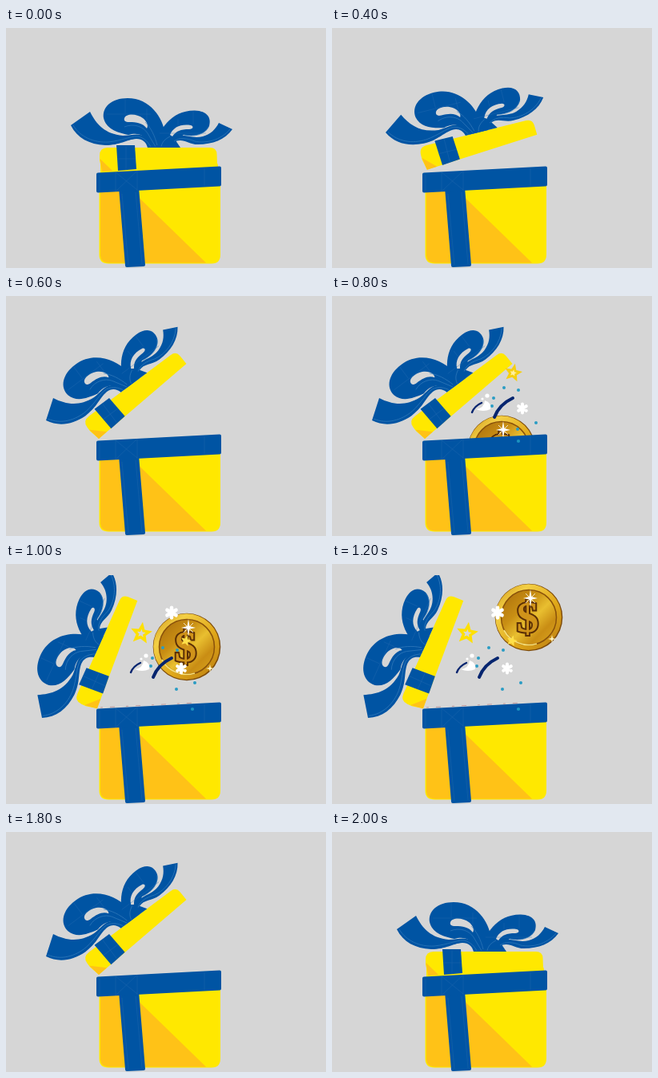
Recreate the animation shown at these times as an HTML page. Size 400 by 301 pixels, loop 2.2 s.

```html
<!DOCTYPE html>
<html lang="en">
<head>
<meta charset="utf-8">
<title>Gift box</title>
<style>
  html, body { margin: 0; width: 100%; height: 100%; overflow: hidden; background: #d6d6d6; }
  svg { display: block; width: 400px; height: 301px; }
  .blue { fill: #0054a3; }
  .shine { fill: none; stroke: #3b80bf; stroke-width: .8; opacity: .75; }
  .seam { fill: none; stroke: #2a6db2; stroke-width: .6; opacity: .6; }
  .streak { fill: none; stroke: #06256f; stroke-linecap: round; }
  #coin text { font: bold 55px "Liberation Serif", serif; text-anchor: middle; }
</style>
</head>
<body>
<svg viewBox="0 0 400 301">
  <defs>
    <linearGradient id="rim" x1="0" y1="0" x2="1" y2="1">
      <stop offset="0" stop-color="#c98d14"/><stop offset=".25" stop-color="#f3cf45"/>
      <stop offset=".6" stop-color="#e0a81a"/><stop offset="1" stop-color="#b87a10"/>
    </linearGradient>
    <linearGradient id="face" x1="0" y1="0" x2="1" y2="1">
      <stop offset="0" stop-color="#a86c0c"/><stop offset=".35" stop-color="#c98f14"/>
      <stop offset=".55" stop-color="#e9bf30"/><stop offset=".75" stop-color="#c98d14"/>
      <stop offset="1" stop-color="#dba920"/>
    </linearGradient>
    <clipPath id="stage"><path d="M0 14H400V301H0Z"/></clipPath>
    <path id="star" d="M0-11L3-3.5L11-3L5 2.5L7 10L0 6L-7 10L-5 2.5L-11-3L-3-3.5Z"/>
    <g id="flower" stroke="#fff" stroke-width="4" stroke-linecap="round">
      <path d="M0-5.500V5.500M-4.800-2.800L4.800 2.800M-4.800 2.800L4.800-2.800"/>
    </g>
  </defs>

  <g id="coin">
    <circle r="42.3" fill="#7d4a09"/>
    <circle cx="-.4" cy="-.4" r="41.3" fill="url(#rim)"/>
    <circle r="34.5" fill="url(#face)" stroke="#8a520b" stroke-width="1.5"/>
    <path d="M-31 16A35 35 0 0 0 10 33" fill="none" stroke="#f9e27a" stroke-width="1.6"/>
    <text x="-1.500" y="18" fill="#d0931a" stroke="#5c3006" stroke-width="4" paint-order="stroke">$</text>
    <path d="M2-35L3.5-26L11-24L3.5-22.5L2-13L.5-22.5L-7-24L.5-26Z" fill="#fff"/>
    <path d="M-4-30L8-18M8-30L-4-18" stroke="#fff" stroke-width=".8"/>
    <path d="M29 22L30 26L34 27L30 28L29 32L28 28L24 27L28 26Z" fill="#fff4c0"/>
  </g>

  <path id="seal" d="M118 170H264.500L266 180L118 190Z" fill="#ffe800"/>
  <g clip-path="url(#stage)">
    <g id="lid">
      <path d="M127 150H255Q263 150 263.500 158L264 170.500L120 180L117 166V160Q117 150 127 150Z" fill="#ffe800"/>
      <path d="M117.5 164L133 179L120 180Z" fill="#ffc217"/>
      <path class="blue" d="M138 147H161L163 177L140 179Z"/>
      <g class="blue">
        <path d="M81 122L105 105C113 121 124 133 146 135C158 135 167 130 176 138L184 150H177C175 143 171 139 163 139C150 140 143 147 124 147C104 146 89 138 81 122Z"/>
        <path fill-rule="evenodd" d="M199 133C196 112 180 88 152 88C132 88 120 99 122 113C125 126 138 131 153 134C166 130 174 136 178 142L183 150H206ZM148 113C150 107 163 107 171 113C177 118 178 123 176 126C171 119 163 118 154 118C149 118 147 116 148 113Z"/>
        <path fill-rule="evenodd" d="M186 150C190 129 206 103 236 103.500C252 104 257 113 254 123C250 133 236 137 222 134L212 141L218 150ZM205 134C209 124 219 120 231 122C235 123 234 127 229 127C218 127 213 129 208 136Z"/>
        <path d="M266 119L283 127C274 140 258 146 240 146C228 146 222 138 212 142L206 137C222 131 232 140 246 136C256 133 262 127 266 119Z"/>
      </g>
      <g class="shine">
        <path d="M84 122C93 137 110 144 128 143C146 141 153 136 165 136C174 138 178 144 181 149"/>
        <path d="M148 124C160 119 172 124 177 132L187 149M174 118C181 125 186 135 189 147"/>
        <path d="M205 136C199 139 195 143 194 149M253 124C248 134 235 137 222 134M280 127C268 141 250 145 236 142C226 138 217 137 210 142"/>
      </g>
      <path class="seam" d="M126 108H181M149 89V107M176 101V116M192 132H250M215 114V122M234 105V121M139 164H162M150 148V178"/>
    </g>
  </g>

  <g id="box">
    <path d="M116.500 190L268 185V284Q268 295.500 257 295.500H128Q116.500 295.500 116.500 284Z" fill="#ffe800"/>
    <path d="M118 195H148L250 294.500H129Q118 294.500 118 284Z" fill="#ffc217"/>
    <path class="blue" d="M141 200H166L174 297Q174 299 172 299L151 300Q149 300 149 298Z"/>
    <path class="blue" d="M115 181.500L267 173.500Q269 173.500 269 175.500V196.500Q269 198.300 267 198.500L115 206.500Q113 206.500 113 204.500V183.500Q113 181.500 115 181.500Z"/>
    <path class="seam" d="M137 181V205M164 179V204M117 184V204M248 176V198M137 181L164 203M137 205L164 179M145 208L153 297M162 206L170 296"/>
  </g>

  <g id="sparks">
    <g id="burst">
      <path class="streak" stroke-width="4" d="M184 142Q190 126 207 118"/>
      <path class="streak" stroke-width="2.4" d="M156 136Q159 128 168 124"/>
      <g id="dots" fill="#2a9cc4"></g>
      <path d="M161 132Q171 131 172 121Q181 124 179 132Q170 136 161 132Z" fill="#fff"/>
      <circle cx="175" cy="115" r="2.6" fill="#fff"/>
      <circle cx="169" cy="119" r="1.6" fill="#fff"/>
      <use href="#flower" x="219" y="131"/>
    </g>
    <circle cx="233" cy="182" r="2.1" fill="#1c93c0"/>
    <use id="early" href="#star" transform="translate(226.500 96) rotate(12) scale(.7)" fill="#fff0a0" stroke="#f5cf10" stroke-width="4"/>
    <g id="late">
      <use href="#star" transform="translate(169 86.500) rotate(8) scale(.85)" fill="#d6d6d6" stroke="#ffe000" stroke-width="4"/>
      <use href="#star" transform="translate(225 96) rotate(15) scale(.6)" fill="#ffe04a"/>
      <use href="#flower" transform="translate(207 61) scale(1.15)"/>
      <path d="M118 180L238 174" stroke="#a5464e" stroke-width=".7" stroke-dasharray="3 9 6 14" opacity=".6"/>
    </g>
  </g>
</svg>
<script>
const $ = id => document.getElementById(id);
const LOOP = 2200;
const closed = [81, 122, 0], ajar = [67, 131, -14], open = [50, 156, -36.9], wide = [45, 193, -65.8];

// Each step: start time, lid pose (tail tip x, y, angle), coin centre, burst offset
const steps = [
  [0, closed],
  [400, ajar],
  [600, open],
  [800, open, [212, 192], [19, 10]],
  [1000, wide, [226, 104], [0, 0]],
  [1200, wide, [246, 67], [0, 0]],
  [1800, open],
  [2000, closed]
];

$("dots").innerHTML = [[196, 105], [214, 108], [236, 149], [213, 157], [183, 118], [181, 128]]
  .map(([x, y]) => `<circle cx="${x}" cy="${y}" r="2"/>`).join("");

const show = (id, on) => $(id).style.display = on ? "" : "none";
const move = (id, value) => $(id).setAttribute("transform", value);

function draw(now) {
  const t = now % LOOP;
  const [, pose, coin, burst] = steps.findLast(s => s[0] <= t);
  const [x, y, angle] = pose;
  move("lid", `translate(${x} ${y}) rotate(${angle}) translate(-81 -122)`);
  show("seal", pose === closed);
  show("coin", coin);
  show("sparks", burst);
  if (coin) {
    move("coin", `translate(${coin})`);
    move("burst", `translate(${burst})`);
    show("early", pose === open);
    show("late", pose === wide);
  }
}

function tick() {
  draw(performance.now());
  requestAnimationFrame(tick);
}
tick();
</script>
</body>
</html>
```
